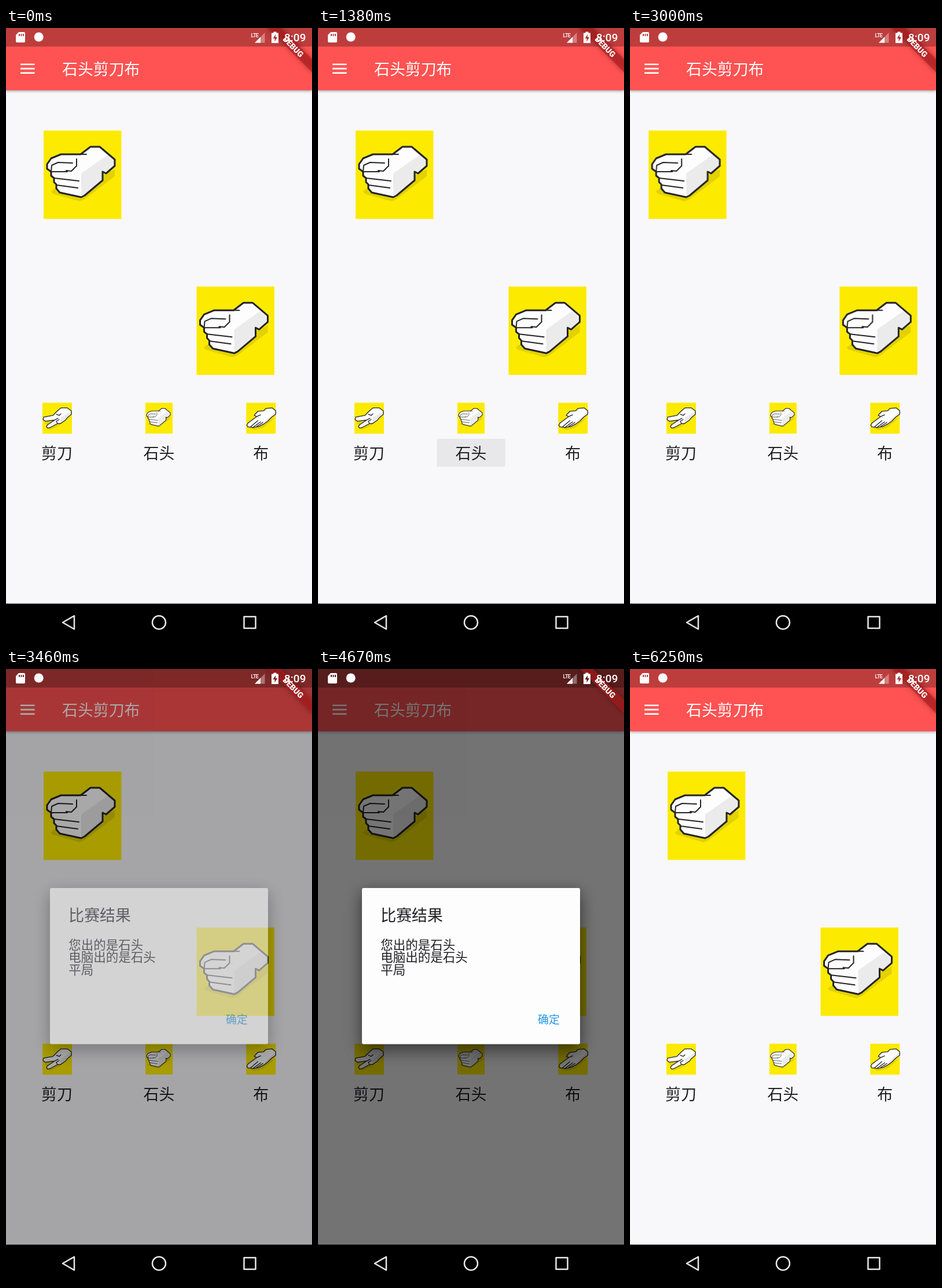
An HTML page that plays this animation: 529x1058 px, repeating every 6.29 s.

```html
<!DOCTYPE html>
<html lang="zh-CN">
<head>
<meta charset="utf-8">
<title>石头剪刀布</title>
<style>
  html, body { margin: 0; width: 100%; height: 100%; overflow: hidden; background: #000; }
  svg { display: block; width: 100vw; height: 100vh; }
  text { font-family: "Noto Sans CJK SC", "Noto Sans CJK", "Noto Sans", sans-serif; font-size: 26.9px; fill: #202024; }
  .roboto { font-family: Roboto, sans-serif; }
  .body { font-size: 21.5px; }
  .ok { font-size: 18.9px; fill: #2196e3; }
  .line { fill: none; stroke: #242428; stroke-linejoin: round; stroke-linecap: round; }
  .bar { filter: drop-shadow(0 2px 2px rgba(0, 0, 0, .28)); }
  .card { filter: drop-shadow(0 11px 14px rgba(0, 0, 0, .38)) drop-shadow(0 4px 12px rgba(0, 0, 0, .2)); }
  .ribbon { filter: drop-shadow(0 0 4px rgba(0, 0, 0, .5)); }

  .mine, .foe, .press, .barrier, .dialog { animation: 6290ms linear infinite; }
  .mine { --out: -80.8px; animation-name: swing; }
  .foe { --out: 80.8px; animation-name: swing; }
  .press { opacity: 0; animation-name: press; }
  .barrier { opacity: 0; animation-name: barrier; }
  .dialog { opacity: 0; animation-name: dialog; }

  /* 1 s out and 1 s back, with a short stall on the way out */
  @keyframes swing {
    0%, 22.369% { transform: translateX(0); }
    31.161%, 33.226% { transform: translateX(calc(var(--out) * .553)); }
    33.227% { transform: translateX(calc(var(--out) * .683)); }
    38.267% { transform: translateX(var(--out)); }
    54.165%, 100% { transform: translateX(0); }
  }
  @keyframes press {
    0%, 21.3% { opacity: 0; }
    22.6% { opacity: .12; }
    25.5%, 100% { opacity: 0; }
  }
  @keyframes barrier {
    0% { opacity: 0; }
    54.165% { opacity: 0; animation-timing-function: cubic-bezier(.25, .1, .25, 1); }
    56.55% { opacity: .54; }
    93.8% { opacity: .54; animation-timing-function: cubic-bezier(.75, 0, .75, .9); }
    96.18%, 100% { opacity: 0; }
  }
  @keyframes dialog {
    0% { opacity: 0; }
    54.165% { opacity: 0; animation-timing-function: cubic-bezier(0, 0, .58, 1); }
    56.55% { opacity: 1; }
    93.8% { opacity: 1; animation-timing-function: cubic-bezier(.42, 0, 1, 1); }
    96.18%, 100% { opacity: 0; }
  }
</style>
</head>
<body>
<svg viewBox="0 0 529 1058" preserveAspectRatio="none">
  <defs>
    <g id="rock">
      <path fill="#fcea00" d="M0 0h134.5v152.5H0z"/>
      <path fill="#e3d100" d="M12 105L24 97 66 111 102 77 123 67V79L70 119 62 122 16 109z"/>
      <path fill="#fdfdfd" d="M30 41H64L81 28 97 28 123 50V61L108 74 102 71V86L71 112 65 115 28 107 22 100V93L18 89V82L13 78V71L6 66V58L13 48z"/>
      <path fill="#ebebec" d="M65 74L112 41 123 50V61L108 74 102 71V86L71 112 65 115z"/>
      <path class="line" stroke-width="3" d="M30 41H64L81 28 97 28 123 50V61L108 74 102 71V86L71 112 65 115 28 107 22 100V93L18 89V82L13 78V71L6 66V58L13 48z"/>
      <path class="line" stroke-width="2" d="M64 41H74M50 56L25 55 14 60 13 71 41 71M57 49V61L48 70 39 69M18 82L61 87M22 94L59 99M102 71V80"/>
    </g>
    <g id="scissors">
      <path fill="#fcea00" d="M0 0h51v53.5H0z"/>
      <path fill="#e3d100" d="M3 31L22 27 46 24 30 39 12 47z"/>
      <path fill="#fff" d="M27 13L32 9H43L50 14V20L43 26 40 30 31 36 26 36 13 43 9 44 7 41 9 38 21 30 5 32 1 29 2 25 18 22z"/>
      <path fill="#e9e9ea" d="M31 27L47 16 50 14V20L40 30 31 36z"/>
      <path class="line" stroke-width="1.3" d="M27 13L32 9H43L50 14V20L43 26 40 30 31 36 26 36 13 43 9 44 7 41 9 38 21 30 5 32 1 29 2 25 18 22zM21 30L27 27M24 20L29 22 32 19M26 36L24 32 29 29"/>
    </g>
    <g id="paper">
      <path fill="#fcea00" d="M0 0h51v53.5H0z"/>
      <path fill="#e3d100" d="M6 44L30 38 50 24 44 31 29 43 14 47z"/>
      <path fill="#fff" d="M16 19L20 15 30 14 34 10 45 9 51 14V20L44 25 37 32 30 37 22 41 17 42 11 43 7 42 3 42 1 39 3 35 18 24 14 22z"/>
      <path fill="#e9e9ea" d="M33 31L49 16 51 14V20L37 32 30 37z"/>
      <path class="line" stroke-width="1.3" d="M16 19L20 15 30 14 34 10 45 9 51 14V20L44 25 37 32 30 37 22 41 17 42 11 43 7 42 3 42 1 39 3 35 18 24 14 22zM7 42L20 31M11 43L25 33M18 41L29 34M18 24L25 21"/>
    </g>
  </defs>

  <!-- game -->
  <path fill="#f8f8fb" d="M0 0H529V994H0z"/>
  <path class="bar" fill="#ff5252" d="M0 0H529V107.5H0z"/>
  <path fill-opacity=".26" d="M0 0H529V32H0z"/>
  <path fill="#fff" d="M25 61.4h24.5v2.7H25zM25 68.8h24.5v2.7H25zM25 76.2h24.5v2.7H25z"/>
  <text x="97" y="81" style="fill:#fff">石头剪刀布</text>

  <g class="mine"><use href="#rock" x="65" y="177"/></g>
  <g class="foe"><use href="#rock" x="329.5" y="446.3"/></g>

  <use href="#scissors" x="63" y="646.7"/>
  <use href="#rock" transform="translate(241 646.7) scale(.35)"/>
  <use href="#paper" x="415.3" y="646.7"/>
  <rect class="press" x="205.3" y="709" width="118.5" height="48.3" rx="2.7"/>
  <g text-anchor="middle">
    <text x="88" y="744">剪刀</text>
    <text x="264.5" y="744">石头</text>
    <text x="440.8" y="744">布</text>
  </g>

  <!-- result -->
  <path class="barrier" d="M0 0H529V994H0z"/>
  <g class="dialog">
    <rect class="card" x="76" y="378" width="377" height="269.4" rx="2.7" fill="#fdfdfe"/>
    <text x="108.3" y="435">比赛结果</text>
    <text class="body" x="108.3" y="483.5">您出的是石头</text>
    <text class="body" x="108.3" y="505">电脑出的是石头</text>
    <text class="body" x="108.3" y="526.6">平局</text>
    <text class="ok" x="380" y="611.5">确定</text>
  </g>

  <!-- debug ribbon -->
  <g transform="translate(529 0) rotate(45)">
    <path class="ribbon" fill="#b71c1c" fill-opacity=".63" d="M-54 37.7H54V53.9H-54z"/>
    <text class="roboto" y="50.7" text-anchor="middle" style="font-size:13.7px;font-weight:900;fill:#fff">DEBUG</text>
  </g>

  <!-- status bar -->
  <g fill="#fff">
    <path fill-rule="evenodd" d="M22 7H31Q33 7 33 9V23Q33 25 31 25H19Q17 25 17 23V12zM22 10V14H24V10zM25.500 10V14H27.500V10zM29 10V14H31V10z"/>
    <circle cx="56.700" cy="15.500" r="8"/>
    <path fill-opacity=".35" d="M447.500 8V25.500H430z"/>
    <path d="M440 15.500V25.500H430z"/>
    <path fill-rule="evenodd" d="M462.500 8.500V6.500H467.500V8.500H471V26H459V8.500zM466 11L461.500 18H464.500V23.500L469 16H466z"/>
    <text class="roboto" x="423.500" y="15.500" style="font-size:9.500px;font-weight:500;fill:#fff;letter-spacing:-.8px">LTE</text>
    <text class="roboto" x="481" y="23.300" style="font-size:19px;font-weight:500;fill:#fff">8:09</text>
  </g>

  <!-- navigation bar -->
  <path d="M0 993.500H529V1058H0z"/>
  <g fill="none" stroke="#e8e8e8" stroke-width="2.500" stroke-linejoin="round">
    <path d="M118 1014.500V1037.500L98 1026z"/>
    <circle cx="264.500" cy="1026" r="11.500"/>
    <path d="M411.500 1016H431.500V1036H411.500z"/>
  </g>
</svg>
</body>
</html>
```
